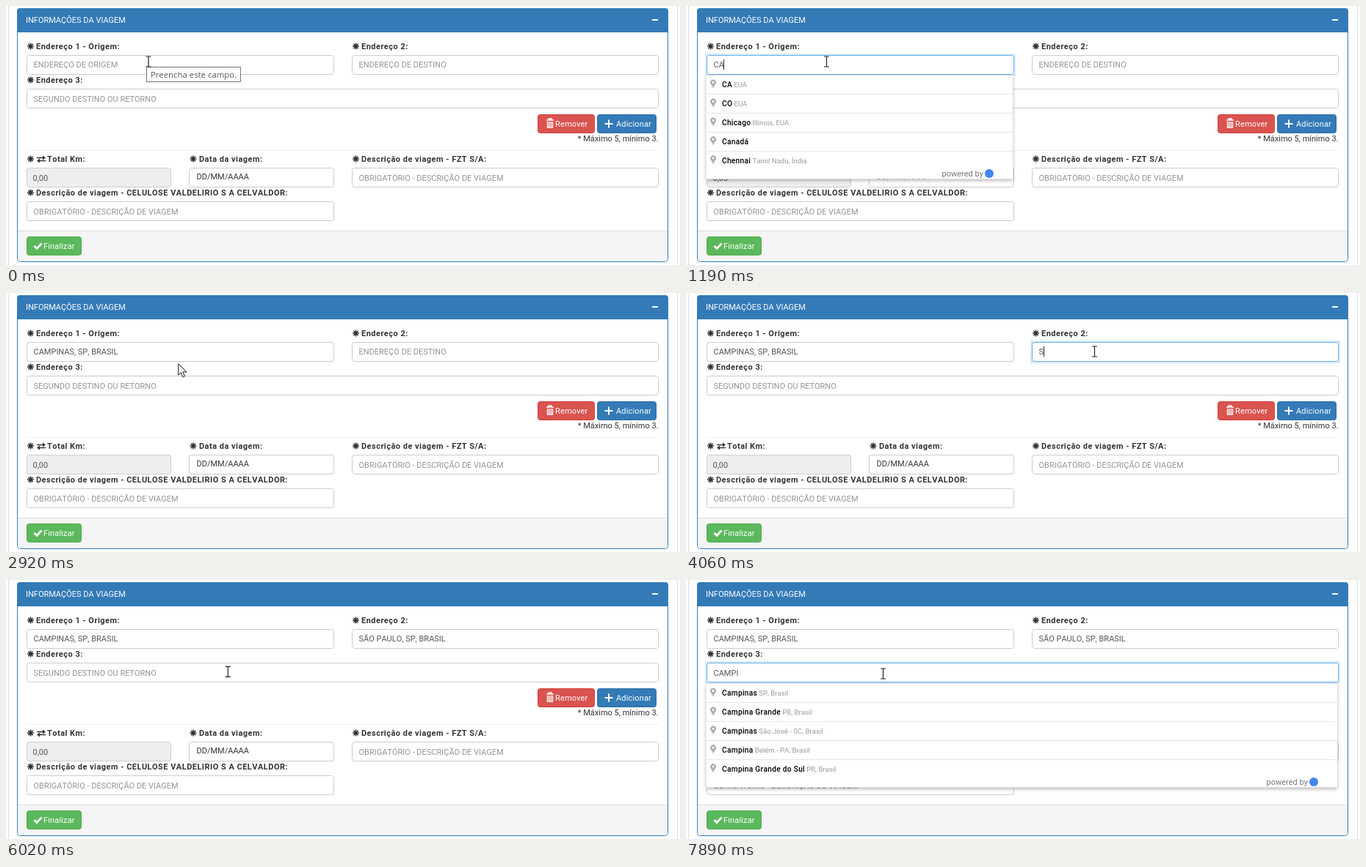
These frames come from a looping animation (918x354 px, 8 s). An HTML page:

```html
<!DOCTYPE html>
<html lang="pt-BR">
<head>
<meta charset="utf-8">
<title>Informações da viagem</title>
<style>
html, body { margin: 0; width: 100%; height: 100%; overflow: hidden; background: #fff; }
svg { display: block; font: 11px Roboto, Arial, sans-serif; font-kerning: none; }
.label { font-weight: 700; fill: #333; letter-spacing: .47px; }
.hint { fill: #949494; }
.value { fill: #555; }
.dark { fill: #333; }
.white { fill: #fff; }
.city { font-size: 10.2px; font-weight: 500; fill: #000; letter-spacing: .28px; }
.region { font-size: 9.6px; font-weight: 400; fill: #999; letter-spacing: 0; }
.sys { font: 11.4px "Open Sans", "Noto Sans", sans-serif; }
.street { font: 700 11.1px "Open Sans", "Noto Sans", sans-serif; }
.short { font: 11px "Open Sans", "Noto Sans", sans-serif; fill: #808080; text-anchor: end; }
</style>
</head>
<body>
<svg width="918" height="354" viewBox="0 0 918 354"><g id="page"></g><g id="live"></g></svg>
<script>
const LOOP = 8000;
const ctx = document.createElement('canvas').getContext('2d');
const [page, live] = ['page', 'live'].map(id => document.getElementById(id));

const text = (x, y, s, cls, more = '') => `<text x="${x}" y="${y}" class="${cls}" ${more}>${s}</text>`;
const box = (x, y, r, b, fill, line = 'none', radius = 0) =>
  `<rect x="${x}" y="${y}" width="${r - x}" height="${b - y}" rx="${radius}" fill="${fill}" stroke="${line}"/>`;
const path = (d, color, width = 1, fill = 'none') =>
  `<path d="${d}" stroke="${color}" stroke-width="${width}" fill="${fill}"/>`;
const input = (x, y, r, fill = '#fff', line = '#ccc') => box(x, y, r, y + 26, fill, line, 3);
const label = (x, y, s, gap = 12.5) =>
  path(`M${x + .5} ${y - 4}h9M${x + 5} ${y - 8.5}v9m-3.1-7.6 6.2 6.2m0-6.2-6.2 6.2`, '#333', 1.6) +
  text(x + gap, y, s, 'label');
const button = (x, y, r, fill, line, tx, s) =>
  box(x, y, r, y + 25, fill, line, 3) + text(tx, y + 16.5, s, 'white', 'letter-spacing=".15"');

// Value in force at time t in a list of [time, value]
const at = (steps, t) => steps.reduce((v, s) => t >= s[0] ? s[1] : v, steps[0][1]);
const within = ([a, b], t) => t >= a && t < b;
// Key presses: each later time adds one more letter
const typing = (word, times) => [[0, ''], ...times.map((t, i) => [t, word.slice(0, i + 1)])];

const lists = {
  c: ['CA|EUA', 'CO|EUA', 'Chicago|Illinois, EUA', 'Canadá|', 'Chennai|Tamil Nadu, Índia'],
  ca: ['CA|EUA', 'Canadá|', 'Caxias do Sul|RS, Brasil', 'Cancún|Quintana Roo, México', 'Campinas|SP, Brasil'],
  camp: ['Campinas|SP, Brasil', 'Campina Grande|PB, Brasil', 'Campinas|São José - SC, Brasil',
    'Campina|Belém - PA, Brasil', 'Campina Grande do Sul|PR, Brasil'],
  s: ['São Paulo|SP, Brasil', 'Santos|SP, Brasil', 'Salvador|BA, Brasil', 'Santa Catarina|Brasil',
    'Seattle|Washington, EUA'],
  sao: ['São Paulo|SP, Brasil', 'São Paulo|Brasil', 'São Bernardo do Campo|SP, Brasil',
    'São José dos Campos|SP, Brasil', 'São José do Rio Preto|SP, Brasil']
};

const fields = [
  { x: 28.5, y: 67.5, r: 446.5, base: 84, hint: 'ENDEREÇO DE ORIGEM',
    value: [...typing('CAMPINAS', [880, 1180, 1310, 1440, 1580, 1690, 1870, 2010]), [2780, 'CAMPINAS, SP, BRASIL']],
    focus: [490, 2780], caret: [490, 2780], open: [1060, 2780],
    rows: [[0, 'c'], [1310, 'ca'], [1940, 'camp']] },
  { x: 471.5, y: 67.5, r: 888.5, base: 84, hint: 'ENDEREÇO DE DESTINO',
    value: [...typing('SÃO', [4060, 4410, 4910]), [5560, 'SÃO PAULO, SP, BRASIL']],
    focus: [3600, 5560], caret: [3600, 4960], open: [4320, 5560],
    rows: [[0, 's'], [4960, 'sao']] },
  { x: 28.5, y: 113.5, r: 888.5, base: 131, hint: 'SEGUNDO DESTINO OU RETORNO',
    value: typing('CAMPI', [6400, 6510, 7010, 7260, 7390]),
    focus: [6190, LOOP], caret: [6190, 7890], open: [6400, LOOP],
    rows: [[0, 'c'], [6760, 'ca'], [7820, 'camp']] }
];
const LIST_H = 142, ROW_H = 25.9;
const listTop = f => f.base + 10.5;

const streets = [
  ['Rua Orvalhina, 418, sala 206', ', Centro'], ['Avenida Berlandino Talvério', ', Centro'],
  ['Rua das Noralbas', ''], ['Rua Olvéria', ', Centro'], ['Rua Nelito Farduni', ''],
  ['Avenida Doutor Brelas Quintor', ', Centro'], ['Avenida Élio Tarvesi', ''], ['Rua Orvalhina', '']
];

// Pointer stops: time, x, y
const stops = [[0, 194, 76], [590, 194, 76], [680, 191.5, 76], [2410, 191.5, 76], [2700, 112, 107],
  [2780, 112, 107], [3160, 507, 74], [3540, 556.5, 80], [5110, 556.5, 80], [5420, 544, 106.5],
  [5560, 544, 106.5], [6150, 268.5, 128], [LOOP, 268.5, 128]];

function pointer(t) {
  const i = stops.findIndex(s => s[0] > t);
  const [a, b] = [stops[i - 1], stops[i]];
  const p = (t - a[0]) / (b[0] - a[0]), k = p * p * (3 - 2 * p);
  return [a[1] + (b[1] - a[1]) * k, a[2] + (b[2] - a[2]) * k];
}

function drawPage() {
  page.innerHTML =
    path('M3.5 0v354M914.5 0v354', '#ddd') +
    box(15.5, 3.5, 901.5, 349.5, '#fff', '#337ab7', 4) +
    path('M16 307.5H901V345q0 4-4 4H20q-4 0-4-4z', 'none', 0, '#f5f5f5') +
    path('M16 307.5H901', '#ddd') + path('M28 197.5H889', '#eee') +
    path('M15 36V7q0-4 4-4H898q4 0 4 4V36z', 'none', 0, '#337ab7') +
    text(27, 23, 'INFORMAÇÕES DA VIAGEM', 'white') + path('M880 19h8', '#fff', 2) +
    label(28.5, 59, 'Endereço 1 - Origem:') + label(471.5, 59, 'Endereço 2:') + label(28.5, 105, 'Endereço 3:') +
    button(724.5, 148.5, 801.5, '#d9534f', '#d43f3a', 748, 'Remover') +
    path('M736 156h10M739 155.5v-1.5h4v1.5M737.5 158v8h7v-8M739.7 158v7M742.3 158v7', '#fff', 1.4) +
    button(805.5, 148.5, 885.5, '#337ab7', '#2e6da4', 831, 'Adicionar') +
    path('M815.5 161h11M821 155.5v11', '#fff', 2) +
    text(888.5, 185, '* Máximo 5, mínimo 3.', 'dark', 'text-anchor="end"') +
    label(28.5, 213, 'Total Km:', 27.5) +
    path('M42 207.5h8M46 211.5h8', '#333', 1.5) +
    path('M50 204.5l4 3-4 3zM46 208.5l-4 3 4 3z', 'none', 0, '#333') +
    label(250, 213, 'Data da viagem:', 13) + label(471.5, 213, 'Descrição de viagem - FZT S/A:') +
    label(28.5, 259, 'Descrição de viagem - CELULOSE VALDELIRIO S A CELVALDOR:') +
    input(28.5, 221.5, 224.5, '#eee') + text(36.5, 239, '0,00', 'value') +
    input(249.5, 221.5, 446.5) + text(259.5, 237, 'DD/MM/AAAA', 'dark') +
    input(471.5, 221.5, 888.5) + text(480.5, 239, 'OBRIGATÓRIO - DESCRIÇÃO DE VIAGEM', 'hint') +
    input(28.5, 267.5, 446.5) + text(37.5, 285, 'OBRIGATÓRIO - DESCRIÇÃO DE VIAGEM', 'hint') +
    button(28.5, 315.5, 102.5, '#5cb85c', '#4cae4c', 51, 'Finalizar') +
    path('M38.5 328l3.5 3.5 6.5-7', '#fff', 2.8);
}

function drawField(f, t) {
  const value = at(f.value, t), x = f.x + 9;
  let out = '';
  if (within(f.focus, t))
    out += `<g opacity=".25">${path(`M${f.x - 1} ${f.y - 1}H${f.r + 1}V${f.y + 27}H${f.x - 1}z`, '#66afe9', 3)}</g>` +
      input(f.x, f.y, f.r, '#fff', '#66afe9');
  else out += input(f.x, f.y, f.r);
  out += text(x, f.base, value || f.hint, value ? 'value' : 'hint');
  if (within(f.caret, t)) {
    ctx.font = '11px Roboto, Arial, sans-serif';
    const cx = Math.floor(x + ctx.measureText(value).width) + .5;
    out += path(`M${cx} ${f.base - 11}v14`, '#222');
  }
  return out;
}

function drawList(f, t, hover) {
  if (!within(f.open, t)) return '';
  const x = f.x - 1, r = f.r - 1.5, top = listTop(f);
  let out = `<g style="filter:drop-shadow(0 2px 2.5px rgba(0,0,0,.3))">${box(x, top, r, top + LIST_H, '#fff')}</g>`;
  if (hover) out += box(x, top, r, top + ROW_H, '#fafafa');
  out += path(`M${x} ${top}H${r}`, '#d9d9d9');
  lists[at(f.rows, t)].forEach((row, i) => {
    const [city, region] = row.split('|'), y = top + i * ROW_H;
    if (i) out += path(`M${x} ${Math.floor(y) + .5}H${r}`, '#e6e6e6');
    out += path(`M${x + 9.5} ${y + 18.5}q-1-3.5-2.8-5.5a4 4 0 1 1 5.6 0q-1.8 2-2.8 5.5z`, 'none', 0, '#b0b0b0') +
      `<circle cx="${x + 9.5}" cy="${y + 10}" r="1.4" fill="#fff"/>` +
      text(x + 21.5, Math.round(y + 16.5), `${city}<tspan dx="2.2" class="region">${region}</tspan>`, 'city');
  });
  return out + text(r - 96.5, top + 138.5, 'powered by', '', 'fill="#777"') +
    `<circle cx="${r - 32}" cy="${top + 134.5}" r="6" fill="#4285f4"/>`;
}

function drawAutofill() {
  return box(28.5, 94.5, 448.5, 312.5, '#fff', '#000') +
    streets.map(([name, rest], i) => text(36.5, 111 + 24 * i, name + rest, 'street') +
      text(440, 111 + 24 * i, name, 'short')).join('') +
    path('M29 287.5H448', '#777') + text(37, 304, 'Configurações de preenchimento automático', 'sys');
}

function drawPointer(x, y, beam) {
  if (beam) return path(`M${x - 3.5} ${y - 7}h3l.5.5.5-.5h3M${x} ${y - 7}v14M${x - 3.5} ${y + 7}h3l.5-.5.5.5h3`, '#222', 1.2);
  return path(`M${x} ${y}v15.5l3.6-3.4 2.6 6 2.5-1.1-2.6-5.8h5z`, '#111', 1, '#fff');
}

function frame(now) {
  const t = now % LOOP, [x, y] = pointer(t);
  const over = (f, top, height) => x > f.x && x < f.r && y > top && y < top + height;
  const inList = f => within(f.open, t) && over(f, listTop(f), LIST_H);
  const inField = f => over(f, f.y, 26);
  let out = fields.map(f => drawField(f, t)).join('') +
    fields.map(f => drawList(f, t, over(f, listTop(f), ROW_H))).join('');
  if (t < 490) out += box(191.5, 83.5, 319.5, 103.5, '#fff', '#767676') +
    text(197, 98, 'Preencha este campo.', 'sys', 'fill="#575757"');
  if (within([580, 880], t)) out += drawAutofill();
  live.innerHTML = out + drawPointer(x, y, fields.some(inField) && !fields.some(inList));
  requestAnimationFrame(frame);
}

drawPage();
requestAnimationFrame(frame);
</script>
</body>
</html>
```
